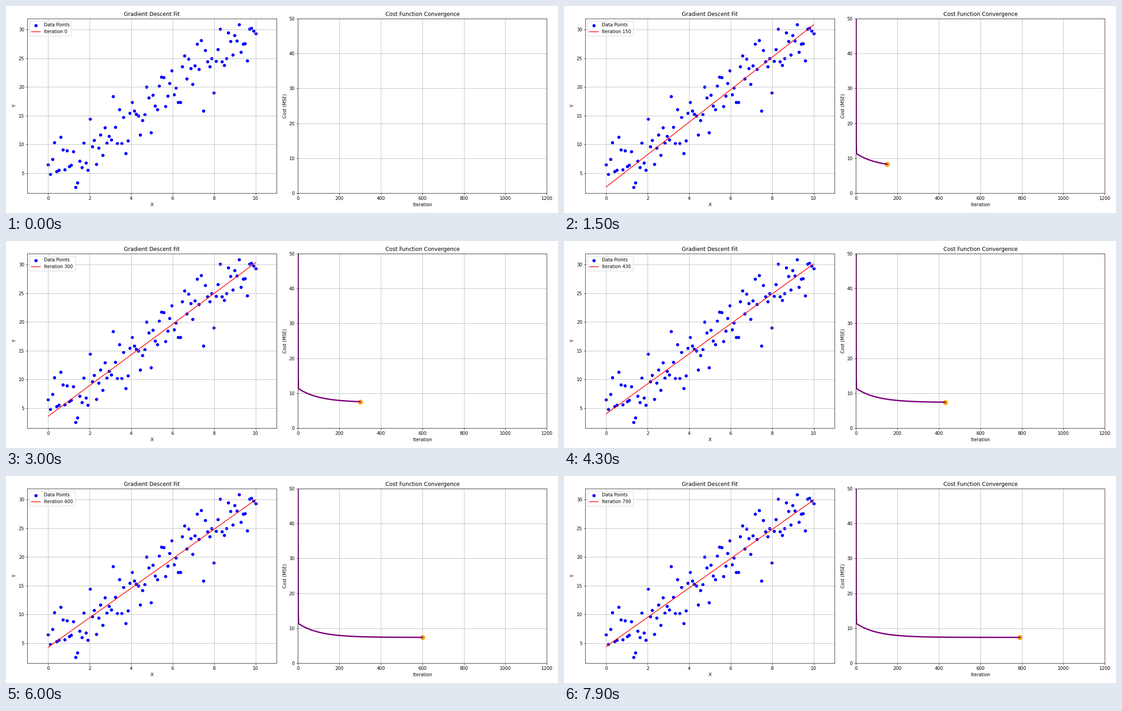
A matplotlib script that plays this animation: 1222x458 px, repeating every 8000 ms.

```python
import numpy as np
import matplotlib.pyplot as plt
from matplotlib.animation import FuncAnimation

WIDTH, HEIGHT, DPI = 1222, 458, 72
FRAMES, INTERVAL = 80, 100
STEPS_PER_FRAME = 10
LEARNING_RATE = 0.01

plt.rcParams["font.family"] = "DejaVu Sans"


def descend(x, y, steps):
    """Return slope, intercept and mean squared error before each step."""
    slope = intercept = 0.0
    history = []
    for _ in range(steps):
        error = slope * x + intercept - y
        history.append((slope, intercept, np.mean(error ** 2)))
        slope -= LEARNING_RATE * 2 * np.mean(error * x)
        intercept -= LEARNING_RATE * 2 * np.mean(error)
    return np.array(history).T


def add_panel(fig, left, title, xlabel, ylabel, xlim, ylim):
    top, bottom, width = 28.4, 413.6, 551.2
    ax = fig.add_axes([left / WIDTH, 1 - bottom / HEIGHT,
                       width / WIDTH, (bottom - top) / HEIGHT])
    ax.set(title=title, xlabel=xlabel, ylabel=ylabel, xlim=xlim, ylim=ylim)
    ax.grid(True)
    return ax


np.random.seed(42)
x = np.linspace(0, 10, 100)
y = 2.5 * x + 5 + 3 * np.random.randn(x.size)
slopes, intercepts, costs = descend(x, y, FRAMES * STEPS_PER_FRAME)
iterations = np.arange(costs.size)

fig = plt.figure(figsize=(WIDTH / DPI, HEIGHT / DPI), dpi=DPI)

fit_ax = add_panel(fig, 47.4, "Gradient Descent Fit", "X", "Y",
                   (-1, 11), (y.min() - 1, y.max() + 1))
fit_ax.scatter(x, y, color="blue", label="Data Points")
fit_line, = fit_ax.plot([], [], color="red", label="Iteration 0")
legend = fit_ax.legend(loc="upper left")

cost_ax = add_panel(fig, 646.1, "Cost Function Convergence", "Iteration",
                    "Cost (MSE)", (0, 1200), (0, 50))
cost_line, = cost_ax.plot([], [], color="purple", linewidth=3)
cost_dot = cost_ax.scatter([0], [costs[0]], color="orange", s=100)


def update(frame):
    step = frame * STEPS_PER_FRAME
    fit_line.set_data(x, slopes[step] * x + intercepts[step])
    legend.get_texts()[1].set_text(f"Iteration {step}")
    cost_line.set_data(iterations[:step + 1], costs[:step + 1])
    cost_dot.set_offsets([[step, costs[step]]])
    return fit_line, legend, cost_line, cost_dot


anim = FuncAnimation(fig, update, frames=FRAMES, interval=INTERVAL,
                     repeat=True, repeat_delay=0, blit=False)
plt.show()
```
